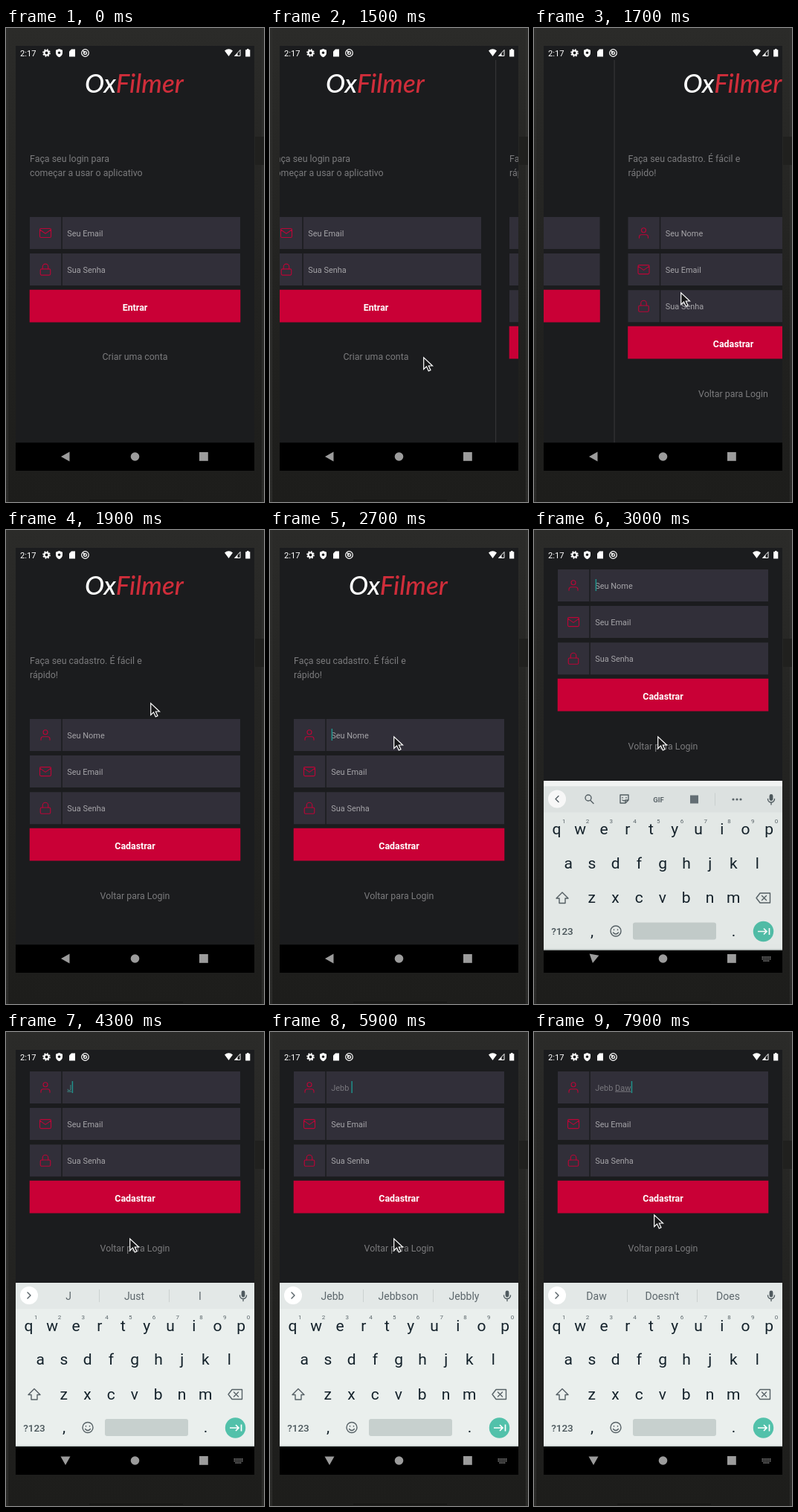
An HTML page that plays this animation: 347x637 px, repeating every 8 s.

```html
<!DOCTYPE html>
<html lang="pt">
<head>
<meta charset="utf-8">
<title>App login</title>
<style>
html, body { margin: 0; width: 100%; height: 100%; overflow: hidden; background: #1e1e1c; }
svg { display: block; width: 347px; height: 637px; font-family: Roboto, sans-serif; }
.logo { font: italic 500 35px Lato, sans-serif; fill: #fff; }
.body { font-size: 12.4px; fill: #7b7b7d; }
.field { font-size: 10.93px; fill: #a5a4a8; white-space: pre; }
.typed { fill: #77767c; }
.button { font-size: 12.4px; font-weight: 700; fill: #fff; }
.mid, .keys text, .words text { text-anchor: middle; }
.line { fill: none; stroke: #bb0537; stroke-width: 1.5; stroke-linecap: round; stroke-linejoin: round; }
.keys { font-size: 21px; fill: #14222b; }
.keys .hint { font-size: 8px; fill: #5a656a; }
.keys .small { font-size: 13.5px; font-weight: 500; fill: #4a565b; }
.words { font-size: 14px; fill: #5d676c; }
.tool { fill: none; stroke: #566166; stroke-width: 1.4; stroke-linecap: round; stroke-linejoin: round; }
</style>
</head>
<body>
<svg viewBox="0 0 347 637">
  <defs>
    <linearGradient id="bezel" x2="0" y2="1">
      <stop stop-color="#2b2b29"/><stop offset=".5" stop-color="#232321"/><stop offset="1" stop-color="#1d1d1b"/>
    </linearGradient>
    <clipPath id="view"><path d="M13 43H334V557H13z"/></clipPath>
    <g id="logo">
      <text class="logo" x="106" y="87">Ox<tspan fill="#cf2d3a">Filmer</tspan></text>
    </g>
    <g id="box" fill="#312f39"><path d="M32 0H74.300V43H32zM75.800 0H315V43H75.800z"/></g>
    <path id="bar" d="M31.700 -.3H315.300V43.400H31.700z" fill="#c90036"/>
    <g id="mail" class="line">
      <path d="M4 4h16a2 2 0 0 1 2 2v12a2 2 0 0 1-2 2H4a2 2 0 0 1-2-2V6a2 2 0 0 1 2-2zM22 6l-10 7L2 6"/>
    </g>
    <g id="lock" class="line"><rect x="3" y="11" width="18" height="11" rx="2"/><path d="M7 11V7a5 5 0 0 1 10 0v4"/></g>
    <g id="user" class="line"><path d="M20 21v-2a4 4 0 0 0-4-4H8a4 4 0 0 0-4 4v2"/><circle cx="12" cy="7" r="4"/></g>
    <g id="mic"><rect x="316.6" y="347.5" width="4.8" height="9" rx="2.4" fill="#4f5a5f"/><path class="tool" d="M314.5 354a4.5 4.5 0 0 0 9 0M319 358.5v3"/></g>
  </defs>

  <rect width="347" height="637" fill="url(#bezel)"/>
  <path d="M0 0H1.500V637H0zM345.500 0H347V637H345.500z" fill="#2e2e2c"/>
  <path d="M2.500 0V637M344.500 0V637" stroke="#30302e"/>
  <path d="M335 146h12v38h-12z" fill="#20201e"/>
  <path d="M112 634.500H238" stroke="#121211"/>
  <path d="M13 24H334V595H13z" fill="#1b1c1e"/>

  <g clip-path="url(#view)">
    <g id="login">
      <use href="#logo"/>
      <text class="body" x="32" y="179.500">Faça seu login para</text>
      <text class="body" x="32" y="199">começar a usar o aplicativo</text>
      <g data-rows="mail:Seu Email,lock:Sua Senha"></g>
      <use href="#bar" y="352"/>
      <text class="button mid" x="173.500" y="379.700">Entrar</text>
      <text class="body mid" id="create" x="173.500" y="446">Criar uma conta</text>
    </g>
    <g id="signup">
      <path d="M13 43H334V780H13z" fill="#1b1c1e"/>
      <path id="edge" d="M13 43h1.200v514h-1.200z" fill="#343436"/>
      <use href="#logo"/>
      <text class="body" x="32" y="179.500">Faça seu cadastro. É fácil e</text>
      <text class="body" x="32" y="199">rápido!</text>
      <g data-rows="user:Seu Nome,mail:Seu Email,lock:Sua Senha"></g>
      <use href="#bar" y="401"/>
      <text class="button mid" x="173.500" y="429">Cadastrar</text>
      <text class="body mid" x="173.500" y="495.500">Voltar para Login</text>
      <rect id="caret" y="267" width="1.5" height="16" fill="#20918b"/>
    </g>
  </g>

  <g fill="#fff">
    <text x="19" y="38" font-size="11.2">2:17</text>
    <circle cx="54.5" cy="33.5" r="3" fill="none" stroke="#fff" stroke-width="2.2"/>
    <circle cx="54.5" cy="33.5" r="4.6" fill="none" stroke="#fff" stroke-width="1.5" stroke-dasharray="1.8 1.8"/>
    <path d="M71.5 28l4.5 1.8v3.4q0 4-4.5 6-4.5-2-4.5-6v-3.4z"/>
    <circle cx="71.5" cy="33.3" r="1.7" fill="#1b1c1e"/>
    <path d="M88 28.5h5v10h-8v-7z"/>
    <g fill="none" stroke="#fff" stroke-width="1.2"><circle cx="106.5" cy="33.5" r="4.8"/><circle cx="106.5" cy="33.5" r="2"/><path d="M103.500 30.500l3 3"/></g>
    <path d="M294 30.5q5.5-4.5 11 0l-5.5 7.5z"/>
    <path d="M307.5 37.5l7.5-8v8z" fill="none" stroke="#fff"/><path d="M307.5 38l4-4.3v4.3z"/>
    <path d="M324 28h2.5v1.2h1.8v9.3h-6.2v-9.3h1.9z"/>
  </g>

  <path d="M13 557.300H334V595H13z"/>
  <g id="keyboard">
    <path d="M13 337H334V557H13z" fill="#f8faf9"/>
    <g id="panel">
      <path d="M13 337H334V557H13z" fill="#eaefed"/>
      <path d="M13 337H334V372H13z" fill="#e3e8e7"/>
      <path d="M13 555.5H334V557H13z" fill="#cbd3d1"/>
      <circle cx="31" cy="354" r="12" fill="#fff"/>
      <g id="tools">
        <path class="tool" d="M33 350l-4 4 4 4"/>
        <circle class="tool" cx="73" cy="352.5" r="4"/><path class="tool" d="M76 356l4 4"/>
        <path class="tool" d="M116 348.5h11v7l-4 4h-7zM127 355.5h-4v4M119 352v.5M124 352v.5M119 355.5q2 1.5 4 0"/>
        <text x="167.5" y="358" font-size="9.5" font-weight="700" fill="#5d676c" text-anchor="middle">GIF</text>
        <path d="M210 349h11v11h-11z" fill="#667177"/>
        <path d="M243.5 346v17" stroke="#cfd5d4"/>
        <g fill="#5d676c"><circle cx="268" cy="354.5" r="1.6"/><circle cx="273" cy="354.5" r="1.6"/><circle cx="278" cy="354.5" r="1.6"/></g>
      </g>
      <g id="strip" class="words">
        <path class="tool" d="M29 350l4 4-4 4"/>
        <path d="M125.5 346v17M219.5 346v17" stroke="#cbd1d0"/>
        <text x="84" y="360"/><text x="172.5" y="360"/><text x="261" y="360"/>
      </g>
      <use href="#mic"/>
      <g class="keys" id="keys">
        <text class="small" x="38" y="536.5">?123</text>
        <text x="78" y="538">,</text><text x="268.5" y="538">.</text>
      </g>
      <path id="shift" class="tool" d="M38 479.5l8 8h-4v6.500h-8v-6.500h-4z"/>
      <path class="tool" d="M304 480.5h13.5v13H304l-5-6.500zM306.5 484l6 6m0-6l-6 6"/>
      <circle class="tool" cx="110" cy="531.5" r="7"/>
      <path class="tool" d="M107.5 529.5v.5M112.5 529.5v.5M106.5 533.5q3.5 4 7 0"/>
      <rect x="133" y="520" width="112" height="23" rx="3" fill="#c7d0ce"/>
      <circle cx="308.5" cy="532" r="13.7" fill="#52c1aa"/>
      <path d="M301 532h12m-4-4l4 4-4 4M316.5 527.5v9" fill="none" stroke="#fff" stroke-width="1.7"/>
    </g>
  </g>

  <g fill="#9c9c9c">
    <path id="back" d="M-6 0L5.5-6.5V6.5z"/>
    <circle cx="173.5" cy="576" r="5.8"/>
    <path d="M260 570h11.800v11.800H260z"/>
    <path id="switch" d="M306.5 574h12m-12 2.500h12m-10 2.500h8" fill="none" stroke="#8d8d8d" stroke-width="1.4" stroke-dasharray="1.5 .6"/>
  </g>
  <path id="pointer" d="M.7 .9V16.5l3.8-3.600 2.800 6 2.700-1.200-2.700-5.700h5.200z" fill="#171718" stroke="#fff" stroke-width="1.2"/>
</svg>

<script>
const LOOP = 8000;
const $ = id => document.getElementById(id);
const svgNS = 'http://www.w3.org/2000/svg';

function addText(parent, text, x, y, cls = '') {
  const el = document.createElementNS(svgNS, 'text');
  el.setAttribute('x', x);
  el.setAttribute('y', y);
  el.setAttribute('class', cls);
  el.textContent = text;
  parent.append(el);
  return el;
}

for (const group of document.querySelectorAll('[data-rows]')) {
  group.dataset.rows.split(',').forEach((row, i) => {
    const [icon, label] = row.split(':');
    const y = 254 + i * 49.1;
    group.insertAdjacentHTML('beforeend',
      `<use href="#box" y="${y}"/><use href="#${icon}" transform="translate(44 ${y + 12.5}) scale(.75)"/>`);
    addText(group, label, 82.3, y + 25.5, 'field');
  });
}
const nameField = document.querySelector('#signup .field');

const letters = [];
[['qwertyuiop', 30.5, 401.5], ['asdfghjkl', 46.2, 447], ['zxcvbnm', 77.7, 493.5]].forEach(([row, x0, y], r) => {
  [...row].forEach((ch, i) => {
    const x = x0 + i * 31.75;
    letters.push(addText($('keys'), ch, x, y));
    if (r === 0) addText($('keys'), (i + 1) % 10, x + 9.7, 386, 'hint');
  });
});

// Each track is a list of [start time, ...values] held until the next start.
const pointerTrack = [
  [0, -40, -40], [700, 245, 457], [800, 221, 452], [900, 207, 449],
  [1500, 206, 442], [1600, 202, 408], [1700, 197, 355], [1800, 194, 285], [1900, 194, 232],
  [2300, 188, 242], [2400, 174, 264], [2500, 166, 277], [7900, 161, 245]
];
const slideTrack = [[0, 321], [1500, 290], [1600, 200], [1700, 94.5], [1800, 28], [1900, 0]];
// keyboard drop, opacity, back-arrow turn
const keyboardTrack = [[0, 0, 0, 0], [2900, 22, .6, -35], [3000, 7.5, .97, -80], [3100, 1.5, 1, -88], [3200, 0, 1, -90]];
const typeTrack = [
  [0, ''], [4300, 'J'], [5000, 'Je'], [5600, 'Jeb'], [5800, 'Jebb'], [5900, 'Jebb '],
  [6400, 'Jebb D'], [6800, 'Jebb Da'], [7600, 'Jebb Daw']
];
const wordTrack = [
  [0, '', '', ''], [4300, 'J', 'Just', 'I'], [5100, 'Je', 'Just', 'Jet'],
  [5900, 'Jebb', 'Jebbson', 'Jebbly'], [7000, 'Da', "Doesn't", 'Does'], [7600, 'Daw', "Doesn't", 'Does']
];
const caretTrack = [[0, 0], [2700, 1], [3200, 0], [3700, 1], [4800, 0], [5000, 1], [7400, 0], [7600, 1]];

const at = (track, t) => track.findLast(step => step[0] <= t).slice(1);
const show = (el, on) => { el.style.display = on ? '' : 'none'; };
const move = (el, x, y, more = '') => el.setAttribute('transform', `translate(${x} ${y}) ${more}`);

let shownName = null;
let nameWidth = 0;
function setName(value) {
  if (value === shownName) return;
  shownName = value;
  nameField.classList.toggle('typed', value !== '');
  nameField.textContent = value || 'Seu Nome';
  nameWidth = value ? nameField.getComputedTextLength() : 0;
  const start = value.lastIndexOf(' ') + 1;
  if (start < value.length) {
    const word = document.createElementNS(svgNS, 'tspan');
    word.style.textDecoration = 'underline';
    word.textContent = value.slice(start);
    if (value.length === 1) word.style.fill = '#3f8580';
    nameField.replaceChildren(value.slice(0, start), word);
  }
}

function draw(t) {
  move($('pointer'), ...at(pointerTrack, t));

  const [slide] = at(slideTrack, t);
  const open = t >= 2900;
  move($('login'), slide - 321, 0);
  move($('signup'), slide, open ? -201 : 0);
  show($('login'), slide > 0);
  show($('signup'), slide < 321);
  show($('edge'), slide > 0);
  $('create').style.opacity = t >= 1100 && t < 1200 ? .35 : 1;

  const [drop, opacity, turn] = at(keyboardTrack, t);
  show($('keyboard'), open);
  show($('switch'), open);
  $('keyboard').style.opacity = opacity;
  move($('panel'), 0, drop);
  move($('back'), 80, 576, `rotate(${turn})`);

  const caps = t >= 4100 && t < 4300;
  for (const key of letters) {
    key.textContent = caps ? key.textContent.toUpperCase() : key.textContent.toLowerCase();
  }
  $('shift').style.fill = caps ? '#566166' : 'none';

  const words = at(wordTrack, t);
  show($('tools'), !words[0]);
  show($('strip'), words[0]);
  $('strip').querySelectorAll('text').forEach((el, i) => { el.textContent = words[i]; });

  setName(at(typeTrack, t)[0]);
  $('caret').setAttribute('x', 82.6 + nameWidth);
  show($('caret'), at(caretTrack, t)[0]);
}

const begin = performance.now();
function tick() {
  draw((performance.now() - begin) % LOOP);
  requestAnimationFrame(tick);
}
tick();
</script>
</body>
</html>
```
